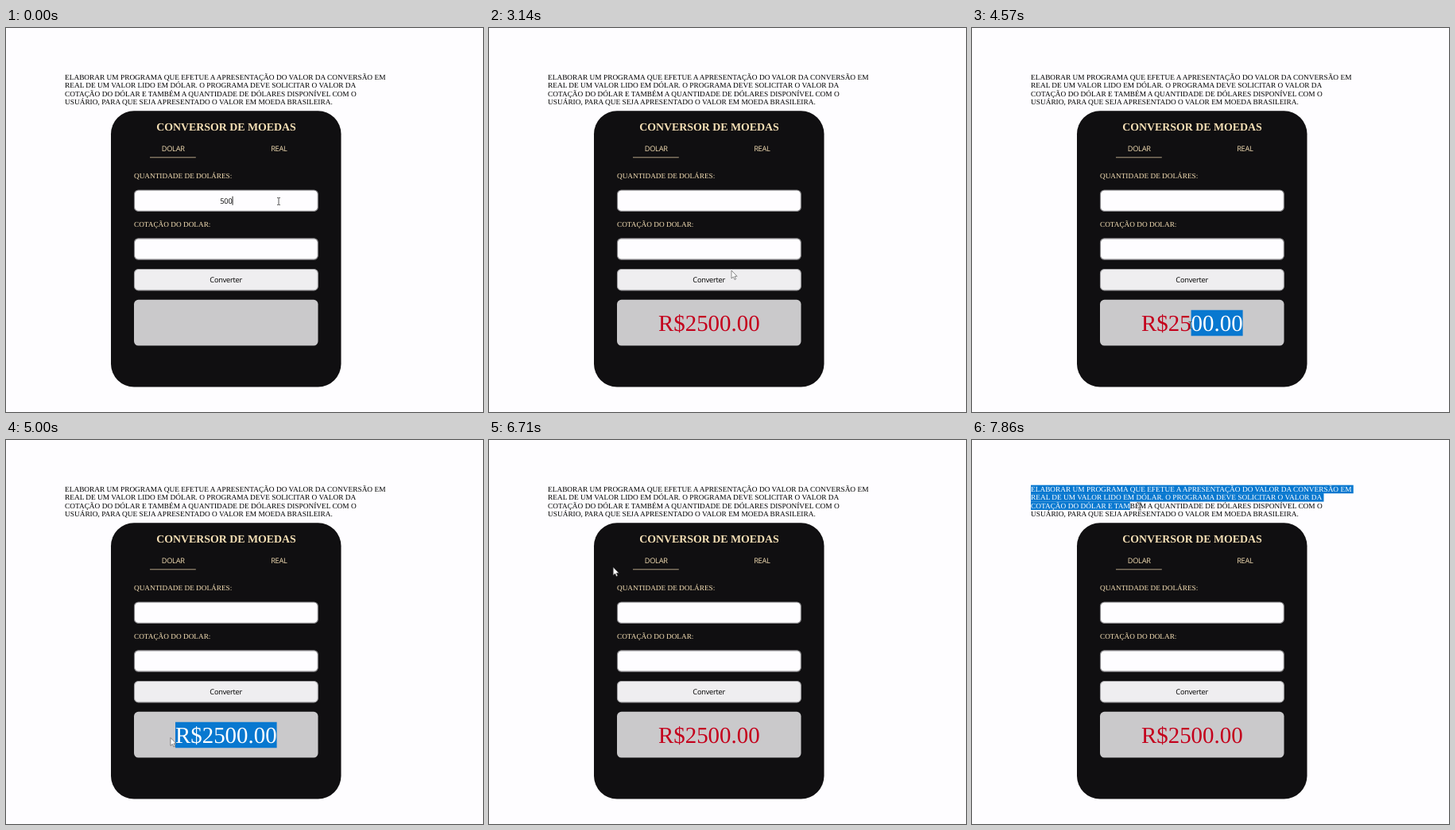
Write an HTML page that moves like this. It is 600 by 483 pixels and loops after 8 s.

```html
<!DOCTYPE html>
<html lang="pt-BR">
<head>
<meta charset="utf-8">
<title>Conversor de moedas</title>
<style>
html, body { margin: 0; width: 100%; height: 100%; overflow: hidden; background: #fefdff; }
svg { display: block; width: 100%; height: 100%; text-rendering: geometricPrecision; }
text { white-space: pre; }
.serif { font: 9.25px "Liberation Serif", "Times New Roman", serif; }
.sans { font: 500 9.25px "Open Sans", "Noto Sans", sans-serif; letter-spacing: -0.25px; text-anchor: middle; }
.title { font-size: 13.87px; font-weight: bold; text-anchor: middle; }
.para { font-size: 9.34px; }
.result { font-size: 28.9px; }
.wheat { fill: #f5dfb5; }
.field { fill: #fefdff; stroke: #858487; stroke-width: 1.15; }
</style>
</head>
<body>
<svg viewBox="0 0 600 483">
  <rect width="600" height="483" fill="#fefdff"/>
  <rect x="132" y="104.3" width="289.5" height="347.2" rx="29" fill="#100f11"/>
  <text class="serif title wheat" x="277" y="128.6">CONVERSOR DE MOEDAS</text>
  <text class="sans wheat" x="210.2" y="154.5">DOLAR</text>
  <text class="sans wheat" x="343.4" y="154.5">REAL</text>
  <rect x="181" y="162.5" width="57.8" height="0.7" class="wheat"/>
  <text class="serif wheat" x="161" y="189.4">QUANTIDADE DE DOLÁRES:</text>
  <rect class="field" x="161.5" y="204" width="230.8" height="26.4" rx="5"/>
  <text class="serif wheat" x="161" y="250.2">COTAÇÃO DO DOLAR:</text>
  <rect class="field" x="161.5" y="264.8" width="230.8" height="26.4" rx="5"/>
  <rect x="161.5" y="303.5" width="230.8" height="26.4" rx="5" fill="#efeef0" stroke="#a3a2a5" stroke-width="1.1"/>
  <text class="sans" x="276.7" y="320.2">Converter</text>
  <rect x="161" y="341.8" width="231.5" height="57.8" rx="5.5" fill="#cac9cb"/>
  <text id="amount" class="sans" x="276.9" y="220.5"></text>
  <text id="rate" class="sans" x="276.9" y="281.3"></text>
  <rect id="caret" width="0.9" height="11" fill="#111"/>
  <g id="lines"></g>
  <g id="cursor">
    <path id="arrow" d="M0 0V10L2.4 7.9L4 11.5L5.6 10.8L4 7.3H7.1Z" fill="#fff" stroke="#444" stroke-width="0.6" stroke-linejoin="round"/>
    <path id="beam" d="M-2 -4.4H-.5L0 -4L.5 -4.4H2M0 -4V4M-2 4.4H-.5L0 4L.5 4.4H2" fill="none" stroke-width="0.9"/>
  </g>
</svg>
<script>
const LOOP = 8000, STEP = 1000 / 7;
const $ = id => document.getElementById(id);
const show = (el, on) => el.setAttribute("visibility", on ? "visible" : "hidden");
const move = (el, x, y) => { el.setAttribute("x", x); el.setAttribute("y", y); };

// Selectable text: three parts each, the middle one highlighted.
function makeLine(str, x, y, size, cls, fill) {
  const top = y - size * 0.891;
  const g = $("lines");
  g.insertAdjacentHTML("beforeend",
    `<g><rect fill="#0878d0" y="${top}" height="${size * 1.125}"/>` +
    `<text class="serif ${cls}" x="${x}" y="${y}" fill="${fill}">` +
    `<tspan></tspan><tspan fill="#fff"></tspan><tspan></tspan></text></g>`);
  const [rect, text] = g.lastElementChild.children;
  const parts = [...text.children];
  parts[0].textContent = str;
  const edges = [...str].map((c, i) => text.getStartPositionOfChar(i).x);
  edges.push(text.getEndPositionOfChar(str.length - 1).x);
  return {
    text, length: str.length,
    nearest: px => edges.reduce((b, e, i) => Math.abs(e - px) < Math.abs(edges[b] - px) ? i : b, 0),
    select(from, to, tail = 0) {
      parts[0].textContent = str.slice(0, from);
      parts[1].textContent = str.slice(from, to);
      parts[2].textContent = str.slice(to);
      rect.setAttribute("x", edges[from]);
      rect.setAttribute("width", edges[to] - edges[from] + tail);
      show(rect, to > from);
    }
  };
}

const para = [
  "ELABORAR UM PROGRAMA QUE EFETUE A APRESENTAÇÃO DO VALOR DA CONVERSÃO EM",
  "REAL DE UM VALOR LIDO EM DÓLAR. O PROGRAMA DEVE SOLICITAR O VALOR DA",
  "COTAÇÃO DO DÓLAR E TAMBÉM A QUANTIDADE DE DÓLARES DISPONÍVEL COM O",
  "USUÁRIO, PARA QUE SEJA APRESENTADO O VALOR EM MOEDA BRASILEIRA."
].map((s, i) => makeLine(s, 74, 65 + i * 10.4, 9.34, "para", "#000"));
const result = makeLine("R$2500.00", 213, 380.5, 28.9, "result", "#c4001c");

// Pointer path: step, x, y
const path = [
  [0, 343, 218], [6, 312, 285], [17, 312, 285], [19, 305, 305], [22, 305, 305],
  [27, 356, 381], [29, 342, 373], [35, 207, 374.5], [36, 207, 374.5],
  [43, 172, 179.5], [45, 172, 179.5], [53, 71, 55], [55, 211, 83.5]
];
function pointer(k) {
  const i = path.findIndex(p => p[0] >= k);
  if (i < 1) return path[0].slice(1);
  const [a, ax, ay] = path[i - 1], [b, bx, by] = path[i];
  let u = (k - a) / (b - a);
  if (b - a > 2) u = u * u * (3 - 2 * u);
  return [ax + (bx - ax) * u, ay + (by - ay) * u];
}

const inside = (x, y, l, t, r, b) => x >= l && x <= r && y >= t && y <= b;

function drawPointer(x, y, hasResult) {
  const label = inside(x, y, 161, 181, 285, 192) || inside(x, y, 161, 242, 258, 253);
  const beam = label || inside(x, y, 161, 203, 393, 231) || inside(x, y, 161, 264, 393, 292) ||
    inside(x, y, 74, 57, 479, 98) || hasResult && inside(x, y, 213, 354, 342, 387);
  $("cursor").setAttribute("transform", `translate(${x} ${y})`);
  show($("arrow"), !beam);
  show($("beam"), beam);
  $("beam").setAttribute("stroke", label ? "#ddd" : "#444");
}

function drawCaret(k) {
  const caret = $("caret");
  show(caret, k < 10 || k >= 12 && k < 18);
  if (k < 7) move(caret, 284.6, 211.7);
  else move(caret, k < 12 ? 276.6 : 279.5, 272.5);
}

function drawSelection(k, x) {
  const picked = k >= 30 && k < 44;
  result.select(picked ? result.nearest(x) : result.length, result.length);
  // The highlight trails slightly behind the pointer.
  const last = k >= 55 ? 2 : k >= 54 ? 1 : -1;
  para.forEach((line, i) => {
    if (i < last) line.select(0, line.length, 2.3);
    else line.select(0, i === last ? line.nearest(x - 13) : 0);
  });
}

function draw(t) {
  const k = Math.min(55, Math.floor((t % LOOP + 5) / STEP));
  const [x, y] = pointer(k);
  const done = k >= 22;
  $("amount").textContent = done ? "" : "500";
  $("rate").textContent = k >= 12 && !done ? "5" : "";
  show(result.text, done);
  drawCaret(k);
  drawSelection(k, x);
  drawPointer(x, y, done);
}

const start = performance.now();
function tick() {
  draw(performance.now() - start);
  requestAnimationFrame(tick);
}
tick();
</script>
</body>
</html>
```
